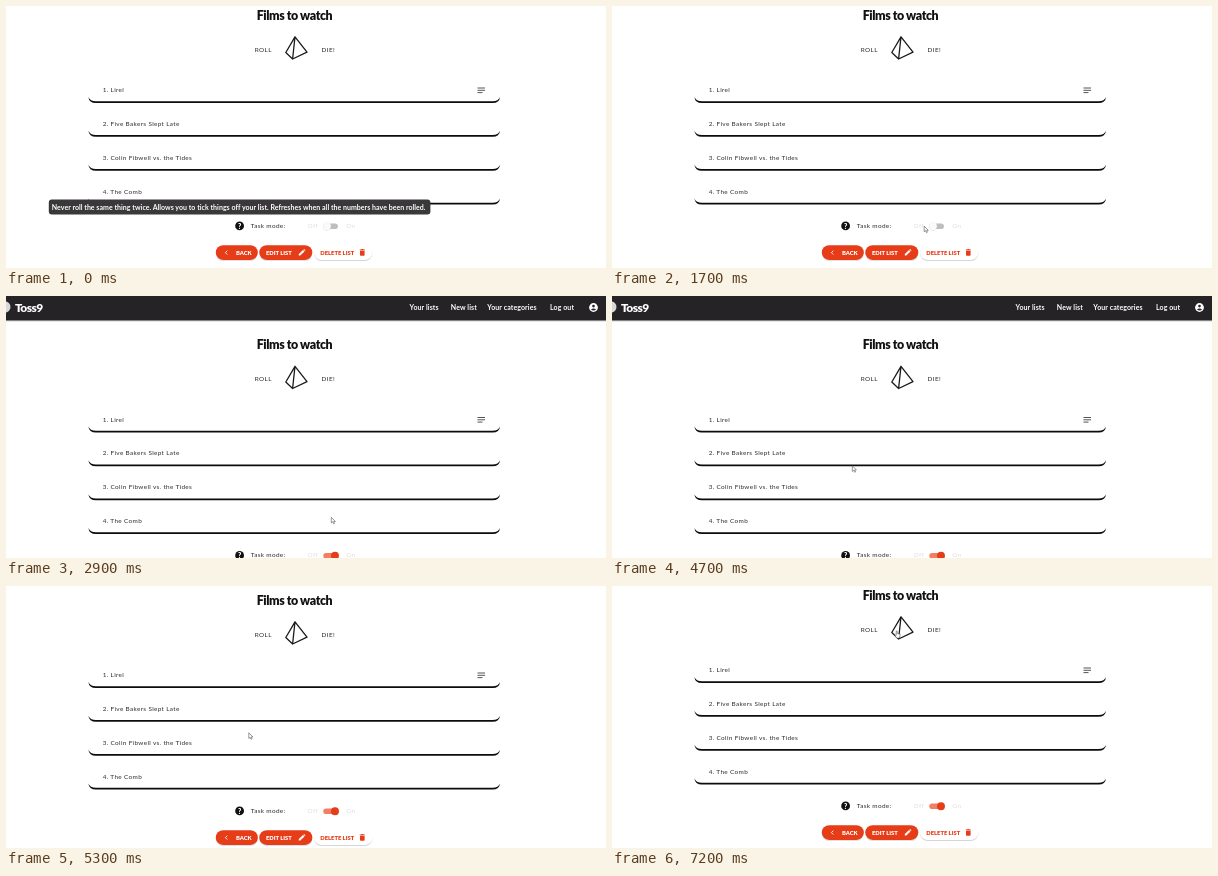
Animation, 600 px wide and 262 px high, one loop 8000 ms. Source, as an HTML page:

```html
<!DOCTYPE html>
<html lang="en">
<head>
<meta charset="utf-8">
<title>Film list</title>
<style>
  html, body { margin: 0; width: 100%; height: 100%; overflow: hidden; background: #fff; }
  svg { display: block; width: 600px; height: 262px; }
  text { font-family: Lato, "Open Sans", sans-serif; white-space: pre; }
  .body { font-size: 6.4px; letter-spacing: .34px; fill: #2b2b2b; }
  .title { font-size: 12.4px; font-weight: 900; letter-spacing: -.4px; fill: #111; }
  .brand { font-size: 12px; font-weight: 900; letter-spacing: -.6px; fill: #fff; }
  .nav { font-size: 7px; font-weight: 700; letter-spacing: .1px; fill: #fff; }
  .tip { font-size: 7px; font-weight: 700; letter-spacing: .03px; fill: #fff; }
  .button { font-size: 5.8px; font-weight: 900; fill: #fff; }
  .faint { fill: #dedede; }
  .red { fill: #e63c18; }
</style>
</head>
<body>
<svg viewBox="0 0 600 262">
  <g id="page">
    <g id="header">
      <rect y="-45" width="600" height="30" fill="#252325"/>
      <rect y="-15" width="600" height="1" fill="#000" opacity=".18"/>
      <circle cx="-1" cy="-28.5" r="5.5" fill="#d8d8d8"/>
      <text class="brand" x="9" y="-23.6">Toss9</text>
      <circle cx="587.5" cy="-28" r="4.4" fill="#fff"/>
      <circle cx="587.5" cy="-29.4" r="1.35" fill="#252325"/>
      <path d="M584.9-26.2Q587.5-28 590.1-26.2Q587.5-23.6 584.9-26.2Z" fill="#252325"/>
    </g>

    <text class="title" x="288.5" y="13.6" text-anchor="middle">Films to watch</text>
    <text class="body" x="248.8" y="45.6">ROLL</text>
    <text class="body" x="315.6" y="45.6">DIE!</text>
    <path d="M289 30.8L279.8 46.5L286.6 53L301 46.2ZL286.6 53" fill="none" stroke="#1a1a1a" stroke-width="1.3" stroke-linejoin="round"/>

    <g id="cards"></g>
    <path d="M471.5 82H479M471.5 84.3H479M471.5 86.6H476.5" stroke="#555" stroke-width="1"/>

    <circle cx="233.6" cy="219.9" r="4.4" fill="#111"/>
    <text x="233.6" y="222.5" text-anchor="middle" font-size="7" font-weight="900" fill="#fff">?</text>
    <text class="body" x="244.8" y="221.9">Task mode:</text>
    <text class="body faint" x="301.5" y="221.9">Off</text>
    <text class="body faint" x="340.3" y="221.9">On</text>
    <rect id="track" x="317.3" y="217.4" width="14.6" height="5.6" rx="2.8"/>
    <circle cx="0" cy="220.6" r="4.1" fill="#000" opacity=".12" id="shade"/>
    <circle cx="0" cy="220.2" r="3.9" id="thumb"/>

    <rect x="209.8" y="240" width="42" height="14.8" rx="7.4" fill="#000" opacity=".16"/>
    <rect class="red" x="209.8" y="239.2" width="42" height="14.8" rx="7.4"/>
    <path d="M221.3 244.7L219.4 246.6L221.3 248.5" fill="none" stroke="#fff" stroke-width=".9"/>
    <text class="button" x="230" y="248.7">BACK</text>

    <rect x="253.3" y="240" width="53" height="14.8" rx="7.4" fill="#000" opacity=".16"/>
    <rect class="red" x="253.3" y="239.2" width="53" height="14.8" rx="7.4"/>
    <text class="button" x="260" y="248.7">EDIT LIST</text>
    <path d="M292.8 249.6V248.1L297 243.9L298.5 245.4L294.3 249.6ZM297.4 243.5L298.1 242.9L299.5 244.3L298.9 245Z" fill="#fff"/>

    <rect x="308" y="240" width="58.4" height="14.9" rx="7.4" fill="#000" opacity=".16"/>
    <rect x="308" y="239.2" width="58.4" height="14.8" rx="7.4" fill="#fff"/>
    <text class="button red" x="314.3" y="248.7">DELETE LIST</text>
    <path class="red" d="M353.7 243.4H355.1L355.6 242.9H357L357.5 243.4H358.9V244.2H353.7ZM354 244.7H358.6V249Q358.6 249.8 357.8 249.8H354.8Q354 249.8 354 249Z"/>

    <g id="tip">
      <rect x="42.8" y="193.6" width="381.6" height="15" rx="3" fill="#3a383a"/>
      <text class="tip" x="45.8" y="203.5">Never roll the same thing twice. Allows you to tick things off your list. Refreshes when all the numbers have been rolled.</text>
    </g>
  </g>

  <g id="cursor" fill="#fff" stroke="#555" stroke-width=".6" stroke-linejoin="round">
    <path id="arrow" d="M.3.3V5.9L1.6 4.8L2.6 6.8L3.5 6.4L2.6 4.5H4.4Z"/>
    <path id="hand" d="M1.7.5Q2.5.1 2.7.9V3L5.3 3.7Q5.8 3.9 5.6 4.8L5 7.6H2.3L.4 5Q.3 4.3 1.7 4.9Z"/>
  </g>
</svg>
<script>
const LOOP = 8000, TICK = 100;
const $ = id => document.getElementById(id);
const svg = (tag, attrs, parent, text = "") => {
  const el = document.createElementNS("http://www.w3.org/2000/svg", tag);
  for (const key in attrs) el.setAttribute(key, attrs[key]);
  el.textContent = text;
  parent.append(el);
};

const films = ["Lirel", "Five Bakers Slept Late", "Colin Fibwell vs. the Tides", "The Comb"];
films.forEach((name, i) => {
  const y = 33.85 * i;
  svg("path", {
    d: "M82.4 91Q83 97 90 97H486.500Q493.500 97 494 91Q492.500 95.200 486.500 95.200H90Q84 95.200 82.400 91Z",
    transform: `translate(0 ${y})`, fill: "#0c0c0c"
  }, $("cards"));
  svg("text", { class: "body", x: 96.7, y: 86 + y }, $("cards"), `${i + 1}. ${name}`);
});

[["Your lists", 403.6], ["New list", 444.8], ["Your categories", 481.3], ["Log out", 544]]
  .forEach(([label, x]) => svg("text", { class: "nav", x, y: -25.6 }, $("header"), label));

// Rows are [time, ...values], joined by straight lines.
const scroll = [[0, 0], [2899, 0], [2900, 39.5], [5000, 39.5], [5100, 38.5], [5200, 38.5], [5300, 5], [5400, 0]];
const fade = [[1100, 1], [1200, .38], [1300, 0]];
const toggle = [[2200, 0], [2300, .35], [2400, .85], [2500, 1]];
const path = [
  [1000, 236, 219], [1200, 281.5, 219], [1800, 318, 220], [2000, 325, 221],
  [3700, 325, 221], [4600, 244, 182], [4700, 240, 169.500], [5100, 242, 147],
  [5300, 242.500, 146.500], [6500, 243, 146], [6600, 249, 132], [6700, 264, 95],
  [6800, 277, 58], [6900, 282.500, 44.500]
];

function at(rows, t) {
  const next = rows.findIndex(row => row[0] > t);
  if (next === 0) return rows[0].slice(1);
  if (next < 0) return rows[rows.length - 1].slice(1);
  const a = rows[next - 1], b = rows[next];
  const k = (t - a[0]) / (b[0] - a[0]);
  return a.slice(1).map((v, i) => v + (b[i + 1] - v) * k);
}

const mix = (a, b, k) => `rgb(${a.map((v, i) => Math.round(v + (b[i] - v) * k))})`;
const show = (id, on) => $(id).setAttribute("visibility", on ? "visible" : "hidden");

function draw(now) {
  const t = Math.floor(now % LOOP / TICK) * TICK;
  const [k] = at(toggle, t);
  const [x, y] = at(path, t);
  const hand = (t >= 2000 && t < 2900) || t >= 7200;

  $("page").setAttribute("transform", `translate(0 ${at(scroll, t)[0]})`);
  $("tip").setAttribute("opacity", at(fade, t)[0]);
  $("track").setAttribute("fill", mix([190, 190, 190], [244, 126, 98], k));
  $("thumb").setAttribute("fill", mix([250, 250, 250], [230, 60, 24], k));
  for (const id of ["thumb", "shade"]) $(id).setAttribute("cx", 321 + 8 * k);
  $("cursor").setAttribute("transform", `translate(${x} ${y})`);
  show("arrow", t >= 1000 && !hand);
  show("hand", hand);
  requestAnimationFrame(draw);
}
draw(performance.now());
</script>
</body>
</html>
```
